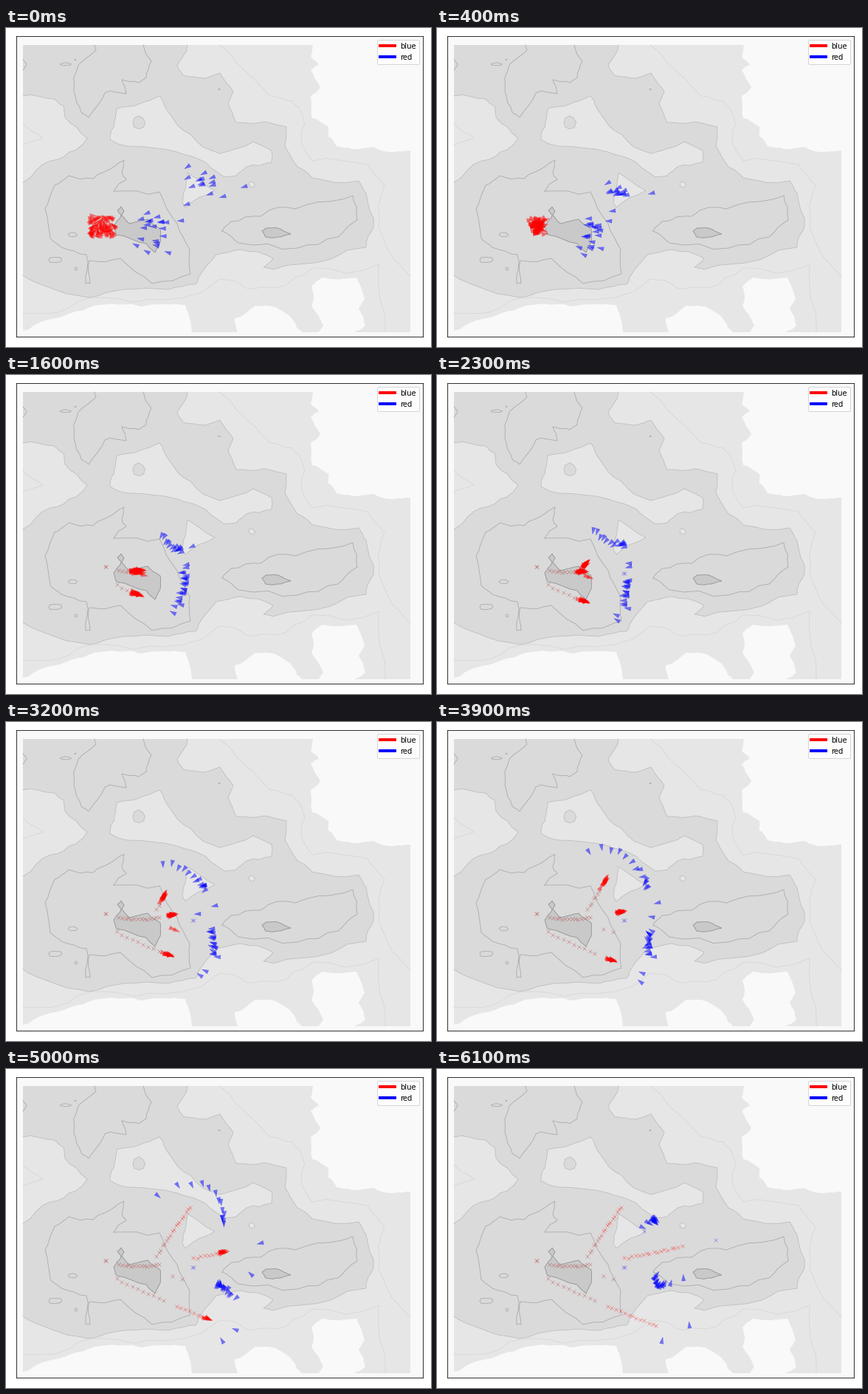
A matplotlib script for the animation above (6200 ms loop, 576 by 432 pixels).

```python
import numpy as np
import matplotlib.pyplot as plt
from matplotlib.animation import FuncAnimation
from matplotlib.collections import PolyCollection
from matplotlib.lines import Line2D
from matplotlib.patches import Polygon

W, H, DPI = 576, 432, 72
FRAMES, STEP = 62, 100
LOW, MID, HIGH, PEAK = "#f9f9f9", "#e6e6e6", "#dadada", "#c9c9c9"
FAINT, SOFT, FIRM, STRONG = "#d6d6d6", "#bdbdbd", "#a9a9a9", "#8f8f8f"

rng = np.random.default_rng(4)
fig = plt.figure(figsize=(W / DPI, H / DPI), dpi=DPI, facecolor="white")
L, R, T, B = 14.3, 565.2, 10.8, 417.7
ax = fig.add_axes([L / W, 1 - B / H, (R - L) / W, (B - T) / H])
ax.set(xlim=(L, R), ylim=(B, T), xticks=[], yticks=[], facecolor=LOW)


# --- terrain: key points joined by slightly ragged lines ---------------
def ragged(points, rough=0.05):
    pts = np.array(points, float)
    for _ in range(2):
        step = np.diff(pts, axis=0)
        side = np.column_stack([-step[:, 1], step[:, 0]])
        mids = pts[:-1] + step / 2 + side * rng.normal(0, rough, (len(step), 1))
        out = np.empty((len(pts) + len(mids), 2))
        out[::2], out[1::2] = pts, mids
        pts = out
    return pts


def contour(points, color):
    ax.plot(*ragged(points).T, color=color, lw=0.8, zorder=1)


def area(points, fill, edge="none"):
    shape = ragged(points + points[:1])
    ax.add_patch(Polygon(shape, fc=fill, ec=edge, lw=0.8, zorder=1))


def shore(points, *corners):
    """Lowland whose ragged edge is closed along the map border."""
    shape = np.vstack([ragged(points), *corners])
    ax.add_patch(Polygon(shape, fc=LOW, ec="none", zorder=1))


def islet(x, y, rx, ry, fill="none", edge=FIRM):
    a = np.linspace(0, 2 * np.pi, 8, endpoint=False)
    r = rng.uniform(0.85, 1.15, 8)
    shape = np.column_stack([x + rx * r * np.cos(a), y + ry * r * np.sin(a)])
    ax.add_patch(Polygon(shape, fc=fill, ec=edge, lw=0.8, zorder=1))


ax.add_patch(plt.Rectangle((23, 23), 525, 389, fc=MID, ec="none", zorder=1))
shore([(416, 23), (413, 38), (424, 50), (413, 57), (426, 80), (413, 92),
       (415, 122), (437, 134), (437, 147), (448, 160), (470, 164), (498, 161),
       (525, 168), (548, 166)], (548, 23))
shore([(23, 410), (53, 396), (88, 386), (120, 376), (165, 374), (185, 377),
       (215, 374), (243, 375), (250, 396), (252, 412)], (23, 412))
shore([(314, 412), (310, 393), (338, 376), (365, 378), (390, 397), (401, 412)])
shore([(424, 412), (430, 403), (414, 376), (414, 350), (428, 338), (475, 338),
       (486, 367), (478, 380), (487, 403), (472, 412)])

outer = ragged([(246, 23), (232, 50), (240, 64), (270, 68), (290, 61), (308, 86),
                (301, 102), (312, 128), (350, 127), (380, 134), (378, 160),
                (395, 188), (415, 203), (478, 207), (488, 224), (498, 270),
                (488, 297), (440, 313), (362, 327), (349, 324), (362, 312),
                (318, 300), (285, 307), (266, 330), (257, 347), (220, 354),
                (160, 354), (112, 365), (55, 350), (23, 335)], 0.04)
west = ragged([(23, 209), (60, 180), (95, 165), (110, 149), (80, 121), (78, 106),
               (65, 96), (23, 92)])
ax.add_patch(Polygon(np.vstack([outer, west, (23, 23)]), fc=HIGH, ec="none", zorder=1))
for line in (outer, west):
    ax.plot(*line.T, color=SOFT, lw=0.8, zorder=1)

area([(147, 127), (150, 109), (180, 103), (208, 92), (221, 115), (250, 144),
      (290, 170), (335, 154), (360, 166), (360, 182), (326, 188), (312, 200),
      (296, 202), (260, 177), (232, 168), (165, 160), (141, 151)], MID, SOFT)
area([(246, 196), (283, 220), (243, 243), (239, 235), (243, 218)], MID, SOFT)
islet(180, 128, 8, 8, HIGH, SOFT)
islet(333, 212, 4, 4, MID, SOFT)
for spot in [(289, 83, 1, 0.5), (94, 43, 1, 0.5), (95, 326, 2, 2),
             (81, 49, 7, 2), (90, 280, 6, 3), (67, 314, 10, 4)]:
    islet(*spot)

contour([(120, 23), (122, 30), (98, 50), (92, 86), (102, 114), (112, 121),
         (134, 88), (163, 89), (157, 70), (180, 74), (190, 67), (197, 45),
         (186, 23)], FIRM)
contour([(23, 43), (28, 50), (23, 57)], FIRM)
contour([(146, 221), (163, 205), (157, 195), (160, 179), (133, 195), (118, 204),
         (85, 200), (66, 213), (53, 245), (60, 285), (75, 297), (109, 307),
         (108, 346), (114, 346), (113, 315), (155, 312), (198, 346), (250, 333),
         (249, 300), (232, 265), (208, 222), (146, 221)], FIRM)
contour([(293, 275), (305, 262), (345, 255), (368, 243), (392, 245), (455, 232),
         (470, 227), (476, 260), (450, 283), (395, 298), (315, 291), (293, 275)], FIRM)
area([(347, 275), (352, 271), (368, 271), (386, 279), (372, 283), (352, 283)], PEAK, STRONG)
area([(146, 268), (156, 254), (151, 247), (156, 242), (160, 248), (157, 254),
      (168, 265), (192, 259), (209, 272), (209, 290), (202, 304), (190, 292),
      (150, 280)], PEAK, STRONG)

contour([(289, 23), (312, 47), (358, 92), (388, 99), (398, 110), (400, 150),
         (415, 180), (490, 185), (513, 213), (505, 240), (505, 270), (518, 300),
         (548, 336)], FAINT)
contour([(23, 386), (70, 385), (130, 365), (215, 368), (265, 358), (290, 340),
         (325, 352), (365, 352), (415, 325), (505, 320), (514, 412)], FAINT)
contour([(23, 130), (50, 149), (23, 158)], FAINT)

# --- red columns: lane of (time, x, y), spans of (first x, last x, count)
MUSTER = np.array([132, 255])
LAST_RED = np.array([331, 240])
COLUMNS = [
    ([(0, 130, 264), (9, 159, 264), (19, 186, 266), (23, 201, 257),
      (32, 214, 236), (39, 228, 215), (48, 255, 178)], [(204, 248, 18)]),
    ([(0, 130, 257), (9, 160, 266), (23, 197, 266), (32, 226, 261),
      (39, 250, 257), (61, 340, 238)], [(134, 134, 2), (153, 207, 14), (254, 332, 17)]),
    ([(0, 130, 264), (9, 158, 266), (23, 203, 273), (38, 249, 289)], [(224, 238, 2)]),
    ([(0, 130, 268), (9, 154, 287), (23, 199, 306), (39, 236, 322),
      (60, 306, 352)], [(149, 214, 10), (232, 297, 13)]),
]


def along(lane, t):
    return np.array([np.interp(t, lane[:, 0], lane[:, k]) for k in (1, 2)])


class Red:
    def __init__(self, lane, x):
        self.lane = lane
        self.end = np.array([x, np.interp(x, lane[:, 1], lane[:, 2]) + rng.uniform(-1, 1)])
        lag = np.interp(x, [134, 155, 185], [24, 14, 7])
        self.fall = np.interp(x + lag, lane[:, 1], lane[:, 0])
        self.start = rng.uniform([112, 254], [147, 281])
        self.shift = np.clip(rng.normal(size=2), -1.6, 1.6)
        self.sway = rng.normal(0, 0.15)

    def pose(self, t):
        ahead = along(self.lane, t + 0.5) - along(self.lane, max(t - 0.5, 0))
        ahead = ahead / (np.hypot(*ahead) or 1)
        across = np.array([-ahead[1], ahead[0]])
        spread = np.interp(t, [9, 23], [6, 2.8])
        p = along(self.lane, t) + spread * (self.shift[0] * ahead + 0.35 * self.shift[1] * across)
        join = min(t / 7, 1)
        p = self.start + (p - self.start) * join
        p = p + (self.end - p) * np.clip((t - self.fall + 4) / 4, 0, 1)
        inward = MUSTER - self.start
        face = ahead * join + inward / np.hypot(*inward) * (1 - join)
        return p, np.arctan2(face[1], face[0]) + self.sway


reds = []
for lane, spans in COLUMNS:
    for first, last, count in spans:
        for x in np.linspace(first, last, count):
            reds.append(Red(np.array(lane, float), x + rng.uniform(-1, 1)))

# --- blue arcs: a curve through three moving points --------------------
KEYS = [0, 9, 23, 32, 39, 50, 61]


def travel(path, t):
    """Position on waypoints at the times in KEYS, slowing at the end."""
    if t > 50:
        t = 50 + 11 * (1 - (1 - (t - 50) / 11) ** 2)
    x, y = zip(*path)
    return np.array([np.interp(t, KEYS[:len(path)], v) for v in (x, y)])


class Arc:
    """Agents that leave a loose crowd and line up on a bowed front."""

    def __init__(self, crowd, spots, head, bend, tail):
        self.spots = spots[:, None]
        self.paths = [[crowd] + path for path in (head, bend, tail)]
        self.start = crowd + np.clip(rng.normal(0, 13, (len(spots), 2)), -24, 24)
        self.jitter = rng.normal(0, 1.8, (len(spots), 2))

    def places(self, t):
        s = self.spots
        a, b, c = (travel(p, max(t, 9)) for p in self.paths)
        front = a * (1 - s) * (1 - 2 * s) + b * 4 * s * (1 - s) + c * s * (2 * s - 1)
        return self.start + (front + self.jitter - self.start) * min(t / 9, 1)


arcs = [
    Arc((270, 212), 1 - np.linspace(1, 0, 13) ** 2,
        [(208, 223), (210, 209), (211, 191), (204, 174), (204, 170), (277, 213)],
        [(214, 235), (228, 222), (245, 201), (252, 178), (272, 157), (293, 205)],
        [(219, 245), (252, 231), (268, 226), (284, 222), (294, 207), (295, 206)]),
    Arc((202, 280), np.linspace(0, 1, 16),
        [(229, 266), (260, 278), (279, 280), (291, 283), (288, 292), (298, 278)],
        [(225, 285), (255, 292), (280, 298), (285, 299), (293, 294), (299, 291)],
        [(211, 304), (254, 314), (282, 316), (289, 316), (307, 308), (312, 288)]),
]

# Single agents: waypoints and the time they fall.
LONERS = [
    ([(323, 215), (251, 235), (253, 230), (268, 222), (283, 224), (295, 206), (280, 219)], 60),
    ([(245, 239), (229, 259), (260, 255), (283, 249), (299, 245), (345, 236), (377, 231)], 57),
    ([(237, 261), (228, 262), (260, 260), (260, 260), (291, 264), (332, 278), (334, 283)], FRAMES),
    ([(176, 294), (213, 301), (243, 325), (270, 337), (278, 340), (311, 353), (342, 347)], FRAMES),
    ([(191, 303), (209, 312), (244, 332), (263, 343), (276, 352), (293, 368), (305, 368)], FRAMES),
    ([(191, 251), (224, 267), (252, 268)], 21),
    ([(193, 262), (226, 268), (254, 268)], 22),
]

# --- drawing -----------------------------------------------------------
DART = np.array([(5, 0), (-4, 2.7), (-4, -2.7)])


def dart(p, angle):
    c, s = np.cos(angle), np.sin(angle)
    return DART @ np.array([(c, s), (-s, c)]) + p


def flock(color):
    return ax.add_collection(PolyCollection([], fc=color, ec=color, lw=0.3, alpha=0.5, zorder=4))


def crosses(color, alpha):
    return ax.plot([], [], "x", color=color, ms=5, mew=0.8, alpha=alpha, zorder=3)[0]


def place(marks, points):
    marks.set_data(*(zip(*points) if points else ([], [])))


red_darts, blue_darts = flock("red"), flock("blue")
old_marks = crosses("#b84040", 0.4)
new_marks = crosses("red", 0.35)
blue_marks = crosses("blue", 0.3)

ax.legend([Line2D([], [], color=c, lw=4) for c in ("red", "blue")],
          ["blue", "red"], loc="upper right", fontsize=10)


def update(t):
    poses = [r.pose(t) for r in reds if t < r.fall]
    fallen = [r for r in reds if t >= r.fall]
    red_darts.set_verts([dart(p, a) for p, a in poses])
    place(old_marks, [r.end for r in fallen if r.fall < 38])
    place(new_marks, [r.end for r in fallen if r.fall >= 38])

    # Every blue agent faces the nearest red one.
    targets = np.array([p for p, _ in poses]) if poses else LAST_RED[None]
    spots = [p for arc in arcs for p in arc.places(t)]
    spots += [travel(path, t) for path, fall in LONERS if t < fall]
    shapes = []
    for p in spots:
        gap = targets - p
        dx, dy = gap[np.argmin(np.hypot(gap[:, 0], gap[:, 1]))]
        shapes.append(dart(p, np.arctan2(dy, dx)))
    blue_darts.set_verts(shapes)
    place(blue_marks, [path[-1] for path, fall in LONERS if t >= fall])
    return red_darts, blue_darts, old_marks, new_marks, blue_marks


anim = FuncAnimation(fig, update, frames=FRAMES, interval=STEP, repeat=True,
                     repeat_delay=0, blit=False)
plt.show()
```
